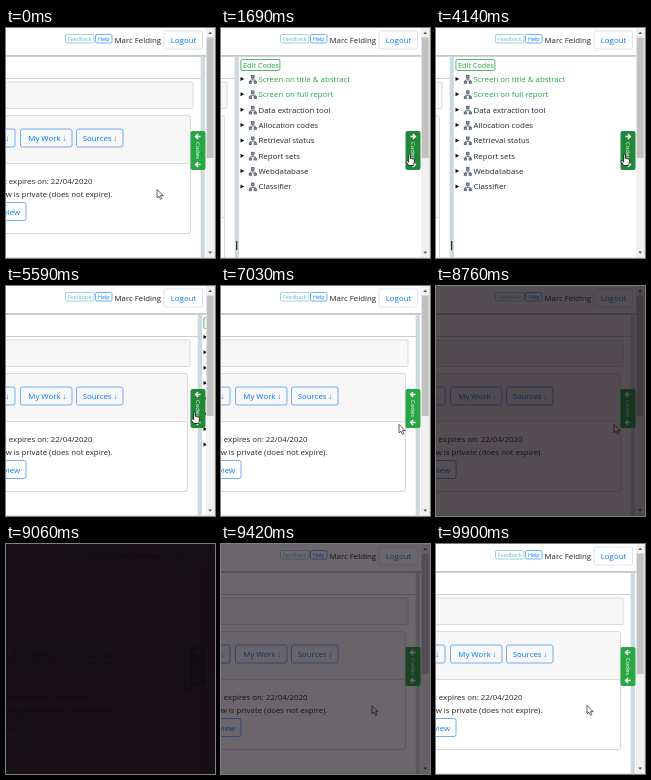
These frames come from a looping animation (209 by 230 pixels, 9.96 s). An HTML page:

```html
<!DOCTYPE html>
<html lang="en">
<head>
<meta charset="utf-8">
<title>Codes panel</title>
<style>
  html, body { margin: 0; width: 100%; height: 100%; overflow: hidden; background: #fff; }
  svg { display: block; width: 100%; height: 100%; }
  text { font-family: "Open Sans", "Noto Sans", sans-serif; font-size: 7.85px; fill: #212529; }
  .blue { fill: #007bff; }
  .green { fill: #28a745; }
  .small { font-size: 5.3px; }
  .btn { fill: none; stroke: #4b9dfa; stroke-width: .8; }
  .box { fill: #f7f7f7; stroke: #d4d4d4; stroke-width: .8; }
</style>
</head>
<body>
<svg viewBox="0 0 209 230" preserveAspectRatio="none">
  <defs>
    <clipPath id="leftClip"><rect id="leftArea" x="-20" y="29" width="216" height="201"/></clipPath>
    <clipPath id="rightClip"><rect y="29" width="200" height="201"/></clipPath>
    <g id="tree" fill="#8b95a5" stroke="#465364" stroke-width=".7">
      <path d="M4 3V5M1.5 7V5H6.5V7" fill="none"/>
      <rect x="2.7" y=".5" width="2.6" height="2.6"/>
      <rect x=".4" y="6.3" width="2.3" height="2"/>
      <rect x="5.3" y="6.3" width="2.3" height="2"/>
    </g>
    <path id="arrow" d="M2.6 -2.4L0 0L2.6 2.4M0 0H5" fill="none" stroke="#fff" stroke-width="1.3"/>
  </defs>
  <rect width="209" height="230" fill="#fff"/>

  <g clip-path="url(#leftClip)">
    <rect y="50" width="200" height="1" fill="#c9ced3"/>
    <rect id="boxA" class="box" x="-20" y="54" height="26.5" rx="1"/>
    <rect id="card" class="box" x="-20" y="87.5" rx="2"/>
    <rect id="cardBody" class="box" x="-20" rx="2" style="fill:#fff"/>
    <g id="tools"></g>
    <g id="info">
      <text x="86.5" y="156" text-anchor="end">Review: it expires on: 22/04/2020</text>
      <text x="106.5" y="168.5" text-anchor="end">This review is private (does not expire).</text>
      <rect class="btn" x="-40" y="174.5" width="60" height="18" rx="2"/>
      <text class="blue" x="14" y="186.5" text-anchor="end">Edit review</text>
    </g>
  </g>

  <g clip-path="url(#rightClip)">
    <g id="panel">
      <rect y="29" width="200" height="201" fill="#fff"/>
      <rect x="-1.3" y="29" width="4.2" height="201" fill="#cbdade"/>
      <rect id="grip" y="213" width="1.3" height="9" fill="#333"/>
      <rect x="4.9" y="31.5" width="39" height="11" rx="1.5" fill="#fff" stroke="#28a745" stroke-width=".8"/>
      <text class="green" x="7" y="39.8" style="font-size:7.3px">Edit Codes</text>
      <g id="codes"></g>
    </g>
  </g>

  <rect y="27" width="200" height="1.8" fill="#c6c6c6"/>
  <rect x="59.5" y="6.5" width="28.5" height="8.5" rx="1.5" fill="#fff" stroke="#82cbd5" stroke-width=".8"/>
  <text class="small" x="73.8" y="12.7" text-anchor="middle" style="fill:#62bcc9">Feedback</text>
  <rect class="btn" x="89.5" y="6.5" width="16.5" height="8.5" rx="1.5"/>
  <text class="small blue" x="97.8" y="12.7" text-anchor="middle">Help</text>
  <text x="108.5" y="15.3">Marc Felding</text>
  <rect x="158" y="3" width="38.5" height="18" rx="1.5" fill="#fff" stroke="#d0deed" stroke-width=".8"/>
  <text class="blue" x="177.5" y="15.3" text-anchor="middle">Logout</text>

  <rect x="200" width="8.5" height="230" fill="#f1f1f1"/>
  <rect x="200.7" y="9.5" width="7" height="120.5" fill="#c1c1c1"/>
  <path d="M202.3 6L204.2 3.7L206.1 6ZM202.3 223.5L204.2 225.8L206.1 223.5Z" fill="#555"/>
  <path d="M208.6 0V229.6H0" fill="none" stroke="#d3dcc4" stroke-width=".8"/>

  <g>
    <rect id="tab" x="184.5" y="103" width="15" height="39" rx="2"/>
    <text transform="translate(189.8 122.5) rotate(90)" text-anchor="middle" style="fill:#fff;font-size:5.9px">Codes</text>
    <g id="arrows">
      <use href="#arrow" x="-2.5" y="-14"/>
      <use href="#arrow" x="-2.5" y="14"/>
    </g>
  </g>

  <path id="pointer" d="M0 0V8.4L2 6.7L3.4 9.8L4.8 9.1L3.5 6.1H6.2Z" fill="#fff" stroke="#222" stroke-width=".7"/>
  <path id="hand" d="M-.8 .8Q0 -.5 .8 .8V4.3L4.3 5.1Q5.2 5.5 5 7L4.2 11.5H-.8L-3.5 7.6Q-3.5 6.3 -2.3 6.7L-.8 8Z" fill="#fff" stroke="#111" stroke-width=".8"/>
  <rect id="shade" width="209" height="230" fill="#10080f"/>
</svg>
<script>
const LOOP = 9960, STEP = 60, TRAVEL = 181, GUTTER = 196;
const $ = id => document.getElementById(id);
const clamp = v => Math.max(0, Math.min(1, v));
const mix = (a, b, k) => a + (b - a) * k;
const set = (id, attrs) => {
  for (const name in attrs) $(id).setAttribute(name, attrs[name]);
};
const show = (id, on) => set(id, { visibility: on ? "visible" : "hidden" });

const tools = [["Collect ↓", -40, 49], ["My Work ↓", 14.5, 51.5], ["Sources ↓", 70.5, 46.5]];
$("tools").innerHTML = tools.map(([label, x, w], i) => `<g id="tool${i}">
  <rect class="btn" x="${x}" y="101" width="${w}" height="18" rx="2"/>
  <text class="blue" x="${x + w - 5.5}" y="113" text-anchor="end">${label}</text></g>`).join("");

const codes = ["Screen on title & abstract", "Screen on full report", "Data extraction tool",
  "Allocation codes", "Retrieval status", "Report sets", "Webdatabase", "Classifier"];
$("codes").innerHTML = codes.map((label, i) => `<g transform="translate(0 ${51 + i * 15.35})">
  <path d="M4.5 -2L8.3 0L4.5 2Z" fill="#111"/>
  <use href="#tree" x="12.8" y="-4"/>
  <text${i < 2 ? ' class="green"' : ""} x="22.5" y="2.8">${label.replace("&", "&amp;")}</text></g>`).join("");

// CSS "ease": cubic-bezier(.25, .1, .25, 1)
function ease(x) {
  if (x <= 0 || x >= 1) return clamp(x);
  const curve = (a, b, s) => 3 * a * s * (1 - s) ** 2 + 3 * b * s * s * (1 - s) + s ** 3;
  let lo = 0, hi = 1;
  for (let i = 0; i < 20; i++) {
    const mid = (lo + hi) / 2;
    if (curve(.25, .25, mid) < x) lo = mid; else hi = mid;
  }
  return curve(.1, 1, lo);
}
const stepped = (t, start, count) => clamp((Math.floor((t - start) / STEP) + 1) / count);

function panelState(t) {
  const slide = start => ease(stepped(t, start, 6));
  return slide(1390) - slide(2550) + slide(3840) - slide(5340);
}

function cursorAt(t) {
  if (t >= 9120 || t < 330) return [151, 161.5];
  if (t < 5910) {
    const p = stepped(t, 330, 11), k = p * p * (3 - 2 * p);
    return [mix(151, 188.5, k), mix(161.5, 126, k)];
  }
  if (t >= 7030) return [178, 138.5];
  if (t >= 6770) return [178, 139];
  const k = 1 - (1 - stepped(t, 5910, 12)) ** 2;
  return [mix(188.5, 178.5, k), mix(126, 139.5, k)];
}

function shadeAt(t) {
  if (t < 8160) return 0;
  if (t >= 9180) return 1 - stepped(t, 9180, 13);
  return 1 - (1 - stepped(t, 8160, 17)) ** 1.2;
}

function draw(t) {
  const open = panelState(t), dx = -TRAVEL * open, edge = GUTTER + dx;
  set("leftArea", { width: edge + 20 });
  set("panel", { transform: `translate(${edge} 0)` });
  show("grip", open > .02);

  // Toolbar buttons wrap away as the pane narrows, making the card header taller.
  const inner = edge - 16;
  let extra = 0;
  tools.forEach(([, x, w], i) => {
    const fits = x + w <= inner;
    show("tool" + i, fits);
    if (!fits) extra += 18;
  });
  set("boxA", { width: 207 + dx });
  set("card", { width: 204.5 + dx, height: 118 + 2 * extra });
  set("cardBody", { y: 135.5 + extra, width: 204.5 + dx, height: 70 + extra });
  set("info", { transform: `translate(0 ${extra})` });
  show("info", inner > 20);

  const [x, y] = cursorAt(t);
  const over = x >= 184 && y >= 102 && y <= 142;
  show("pointer", !over);
  show("hand", over);
  for (const id of ["pointer", "hand"]) set(id, { transform: `translate(${x} ${y})` });
  set("tab", { fill: over ? "#218838" : "#28a745" });
  const opened = t >= 1390 && t < 2550 || t >= 3840 && t < 5340;
  set("arrows", { transform: `translate(192 122.5) scale(${opened ? -1 : 1} 1)` });
  set("shade", { opacity: shadeAt(t) });
}

const origin = performance.now();
function tick() {
  draw((performance.now() - origin) % LOOP);
  requestAnimationFrame(tick);
}
tick();
</script>
</body>
</html>
```
